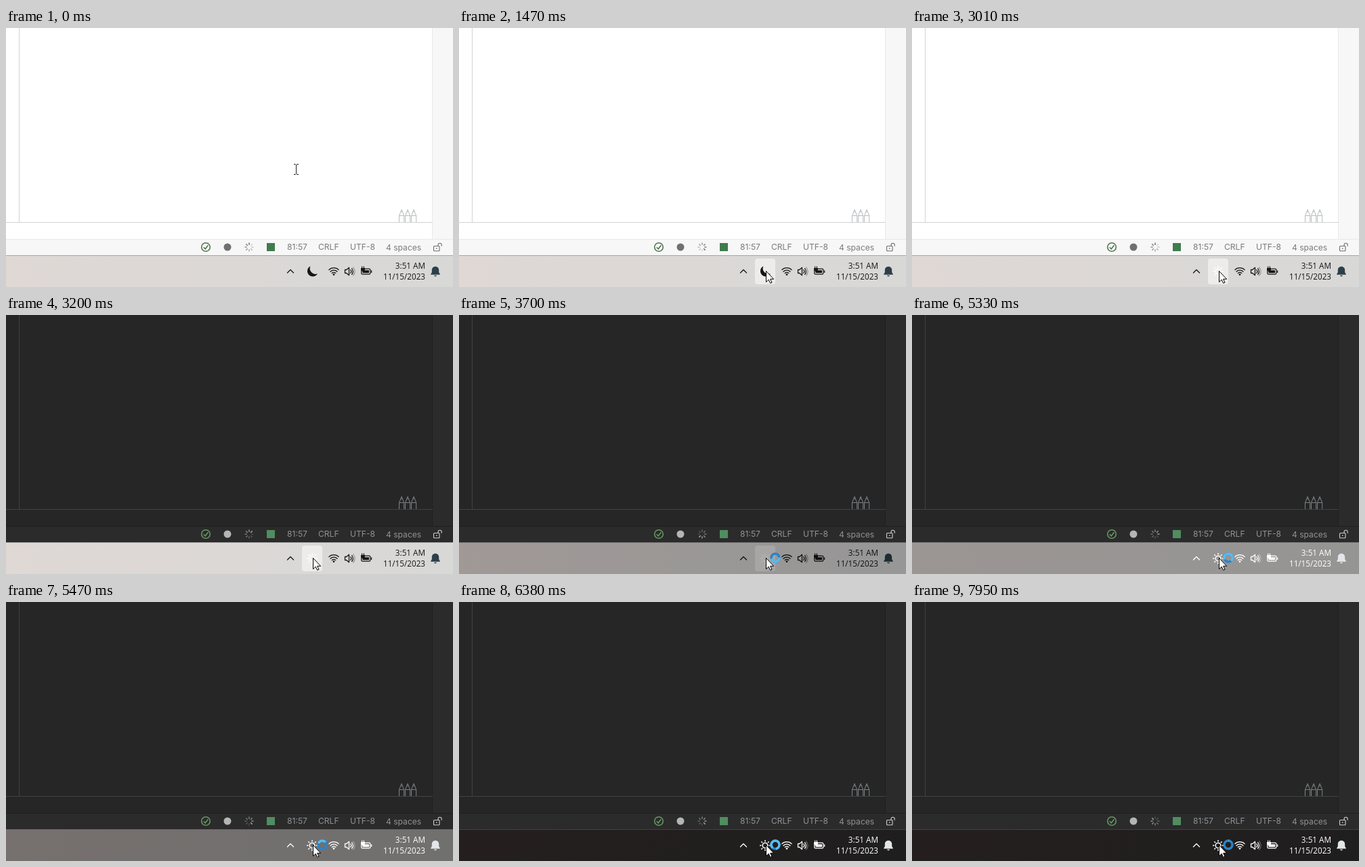
These frames come from a looping animation (660x383 px, 8000 ms). An HTML page:

```html
<!DOCTYPE html>
<html lang="en">
<head>
<meta charset="utf-8">
<title>Theme switch</title>
<style>
html, body { margin: 0; width: 100%; height: 100%; overflow: hidden; }
svg { display: block; width: 660px; height: 383px; }
#app {
  --page: #fff; --panel: #f7f7f7; --edge: #e9e9e9; --rule: #d2d3d4; --text: #7b7b7b;
  --check: #4f7750; --badge: #3f7c4d; --dot: #707070; --pencil: #b7bbbe; --lock: #6c6c6c; --spin: #777;
}
#app.dark {
  --page: #262626; --panel: #2b2b2b; --edge: #1f1f1f; --rule: #414243; --text: #8f9296;
  --check: #64985f; --badge: #508d60; --dot: #b3b5b6; --pencil: #7d8286; --lock: #cfcfcf; --spin: #989ca0;
}
#status text { font: 12.1px Inter, sans-serif; fill: var(--text); }
#clock { font: 11.7px "Open Sans", "Noto Sans", sans-serif; text-anchor: end; fill: currentColor; }
#tip text { font: 12px "Open Sans", "Noto Sans", sans-serif; text-anchor: middle; fill: #333; }
.line { fill: none; stroke: currentColor; stroke-width: 1.3; stroke-linecap: round; stroke-linejoin: round; }
</style>
</head>
<body>
<svg viewBox="0 0 660 383">
  <defs>
    <linearGradient id="wall">
      <stop offset="0" stop-color="#0d0403"/>
      <stop offset=".45" stop-color="#040101"/>
      <stop offset=".7" stop-color="#000"/>
    </linearGradient>
    <linearGradient id="barFill">
      <stop id="barL" offset="0"/>
      <stop id="barR" offset="1"/>
    </linearGradient>
  </defs>

  <g id="app">
    <rect width="660" height="337" fill="var(--page)"/>
    <rect x="629" width="31" height="313" fill="var(--panel)"/>
    <rect x="629" width="1" height="312" fill="var(--edge)"/>
    <rect x="19" width="1" height="287" fill="var(--rule)"/>
    <rect y="287" width="630" height="1" fill="var(--rule)"/>
    <g id="pencils" fill="none" stroke="var(--pencil)"></g>
    <rect y="312" width="660" height="25" fill="var(--panel)"/>
    <rect y="312" width="660" height="1" fill="var(--edge)"/>
    <g id="status">
      <g fill="none" stroke="var(--check)" stroke-width="1.6">
        <circle cx="295" cy="324" r="6.3"/>
        <path d="M291.8 324.2l2.4 2.6 4.2-5.6"/>
      </g>
      <circle cx="327" cy="324" r="5.5" fill="var(--dot)"/>
      <g id="spinner" stroke="var(--spin)" stroke-width="1.6" stroke-linecap="round"></g>
      <rect x="385" y="318" width="12" height="12" fill="var(--badge)"/>
      <text x="415" y="328">81:57</text>
      <text x="461" y="328">CRLF</text>
      <text x="508" y="328">UTF-8</text>
      <text x="561" y="329">4 spaces</text>
      <g fill="none" stroke="var(--lock)" stroke-width="1.1">
        <rect x="631.5" y="322.5" width="8.5" height="7.2" rx="1"/>
        <path d="M638 322.5v-1.6a2.6 2.6 0 0 1 5.2 0v1.8M635.8 325v2"/>
      </g>
    </g>
  </g>

  <rect y="336" width="660" height="47" fill="url(#wall)"/>
  <g id="bar">
    <rect y="336" width="660" height="47" fill="url(#barFill)"/>
    <rect id="barTop" y="336" width="660" height="1"/>
    <rect id="hover" x="437" y="341" width="30" height="38" rx="4" fill="#eeeceb"/>
    <g id="tray">
      <path class="line" d="M415.5 362l4.5-4.5 4.5 4.5"/>
      <path id="moon" fill="currentColor" d="M449.5 352.2A8 8 0 1 0 460 363.2A8.2 8.2 0 0 1 449.5 352.2Z"/>
      <g id="sun" fill="none" stroke="#fff" stroke-width="1.5"></g>
      <g class="line">
        <path d="M476.8 357.6a10.2 10.2 0 0 1 14.4 0M479 360.2a7.1 7.1 0 0 1 10 0M481.2 362.6a4 4 0 0 1 5.6 0"/>
        <circle cx="484" cy="364.6" r=".8" fill="currentColor"/>
        <path d="M500.5 357.5h2.3l3.7-3.2v11.4l-3.7-3.2h-2.3z"/>
        <path d="M508.7 357.6a3.4 3.4 0 0 1 0 4.8M510.6 355.6a6.2 6.2 0 0 1 0 8.8"/>
        <path d="M512.5 353.9a8.6 8.6 0 0 1 0 12.2" opacity=".35"/>
        <rect x="524.8" y="356.2" width="13" height="8" rx="1.6"/>
        <path d="M539.6 358.8v2.6"/>
      </g>
      <path fill="currentColor" d="M527 358.2h9v4h-9zM524 355h1v-2.5h1.2v2.5h1.6v-2.5h1.2v2.5h1v2.2q0 2-2.2 2.2v2h-1.6v-2q-2.2-.2-2.2-2.2z"/>
      <g id="clock">
        <text x="619" y="356">3:51 AM</text>
        <text x="619" y="372">11/15/2023</text>
      </g>
      <path id="bell" d="M634 352.8c-3.2 0-5.2 2.3-5.2 5.3v3.2l-1.6 2.7v.8h13.6v-.8l-1.6-2.7v-3.2c0-3-2-5.3-5.2-5.3zM632 365.8h4q-.4 1.7-2 1.7t-2-1.7z"/>
    </g>
  </g>

  <g id="tip">
    <rect x="389.5" y="293.5" width="125" height="31" rx="4" fill="#f9f9f9" stroke="#dcdcdc"/>
    <text x="452" y="313">Switch to dark mode</text>
  </g>

  <path id="beam" fill="none" stroke="#222" d="M-3.5 -7.5h2.5l1 1 1-1h2.5M0 -7v14M-3.5 7.5h2.5l1-1 1 1h2.5"/>
  <path id="arrow" fill="#fff" stroke="#000" stroke-linejoin="round" d="M.5 .5v16.2l3.7-3.5 2.5 5.2 2.3-1.1-2.4-5h5z"/>
  <g id="busy" fill="none" stroke-width="3.4">
    <circle cx="467" cy="359" r="6" stroke="#2d83c7"/>
    <circle id="arc" cx="467" cy="359" r="6" stroke="#55bdf3" pathLength="100"/>
  </g>
</svg>

<script>
const LOOP = 8000;
const $ = id => document.getElementById(id);
const clamp = v => Math.max(0, Math.min(1, v));
const part = (t, a, b) => clamp((t - a) / (b - a));
const smooth = v => v * v * (3 - 2 * v);
const lerp = (a, b, v) => a + (b - a) * v;
const mix = (a, b, v) => `rgb(${a.map((n, i) => Math.round(lerp(n, b[i], v)))})`;
const set = (id, name, value) => $(id).setAttribute(name, value);
const show = (id, on) => set(id, "opacity", +on);

// A ring of short strokes around a centre
function spokes(x, y, r1, r2, turn = 0) {
  return Array.from({ length: 8 }, (_, i) =>
    `<path d="M0 ${-r1}V${-r2}" transform="translate(${x} ${y}) rotate(${i * 45 + turn})"/>`).join("");
}

$("pencils").innerHTML = [580.5, 589.5, 598.5].map(x =>
  `<path d="M${x} 287v-9.5l3.6-9 3.6 9v9.5M${x} 277.5h7.2M${x + 2.4} 271.8h2.4"/>`).join("");
$("spinner").innerHTML = spokes(359, 324, 3.8, 6);
$("sun").innerHTML = '<circle cx="452" cy="360" r="3.8"/>' + spokes(452, 360, 5.6, 8);

const bars = [...$("spinner").children];

function drawPointer(t) {
  const go = smooth(part(t, 250, 1070)), settle = smooth(part(t, 1070, 1540));
  const x = lerp(428, 451, go) + 2 * settle;
  const y = lerp(209, 358, go) + settle;
  const text = y < 288;
  show("beam", text);
  show("arrow", !text);
  set("beam", "transform", `translate(${Math.round(x) + .5} ${Math.round(y)})`);
  set("arrow", "transform", `translate(${Math.round(x)} ${Math.round(y)})`);
  show("hover", t >= 930 && t < 5130);
}

function drawBar(t) {
  const back = t >= 5130;
  const dim = back ? 1 - Math.pow(1 - part(t, 5100, 5890), 1.3) : 0;
  set("bar", "opacity", back ? 1 : 1 - smooth(part(t, 3400, 4230)));
  set("barL", "stop-color", mix([223, 216, 213], [36, 31, 30], dim));
  set("barR", "stop-color", mix([216, 216, 215], [31, 30, 30], dim));
  set("barTop", "fill", mix([166, 164, 163], [68, 65, 64], dim));
  set("tray", "color", back ? "#fff" : "#161616");
  set("bell", "fill", back ? "#e3e6e8" : "#2d4049");
  show("moon", t < 2680);
  show("sun", t >= 2680);
}

function drawBusy(t) {
  show("busy", t >= 3430);
  const cycle = (t - 3430) / 1130;
  const size = 50 - 48 * Math.cos(cycle * 2 * Math.PI);
  set("arc", "stroke-dasharray", `${size} ${100 - size}`);
  set("arc", "transform", `rotate(${cycle * 360 - 90} 467 359)`);
}

function draw(t) {
  $("app").classList.toggle("dark", t >= 3200);
  const head = Math.floor(t / 125) % 8;
  bars.forEach((bar, i) => bar.setAttribute("opacity", 1 - .105 * ((head - i + 8) % 8)));
  set("tip", "opacity", part(t, 1700, 1850) * (1 - part(t, 2580, 2820)));
  drawPointer(t);
  drawBar(t);
  drawBusy(t);
}

const start = performance.now();
function tick() {
  draw((performance.now() - start) % LOOP);
  requestAnimationFrame(tick);
}
tick();
</script>
</body>
</html>
```
